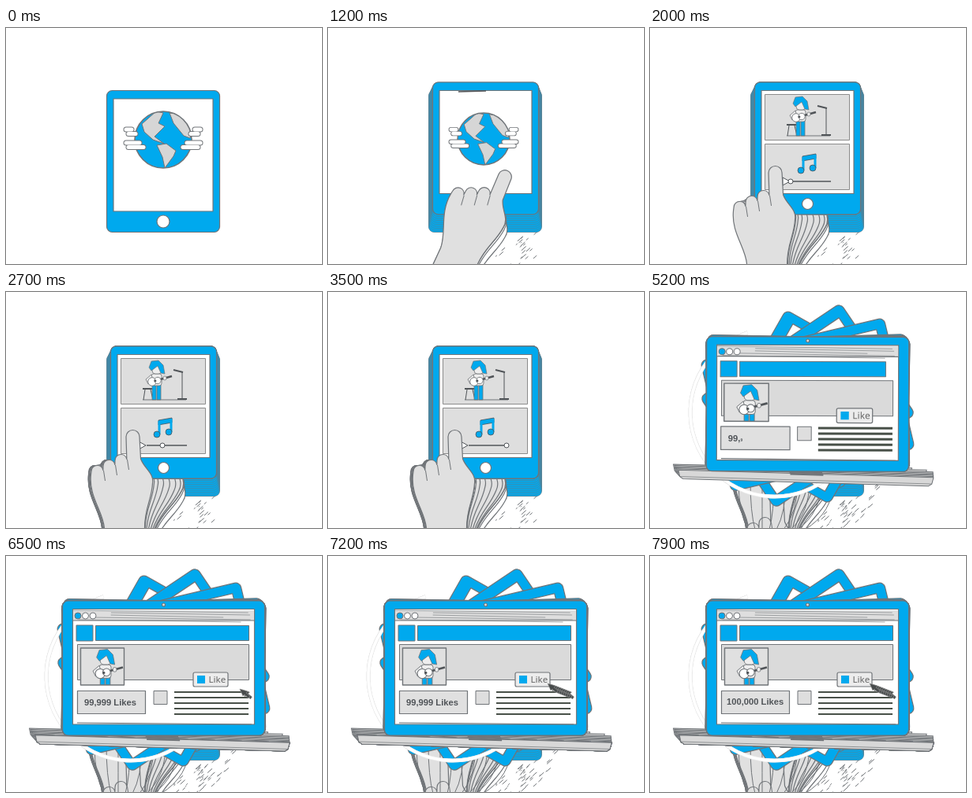
Write an HTML page with a canvas that moves like this. It is 400 by 300 pixels and loops after 8000 ms.

```html
<!DOCTYPE html>
<html lang="en">
<head>
<meta charset="utf-8">
<title>Tablet to laptop</title>
<style>
html, body { margin: 0; width: 100%; height: 100%; overflow: hidden; background: #fff; }
canvas { display: block; width: 400px; height: 300px; }
</style>
</head>
<body>
<canvas id="stage" width="400" height="300"></canvas>
<script>
const ctx = document.getElementById('stage').getContext('2d');
const LOOP = 8000, STEP = 100;
const BLUE = '#00a9ee', GREY = '#dedede', LINE = '#707478', DARK = '#505458';

const clamp = v => Math.max(0, Math.min(1, v));
const ramp = (t, a, b) => clamp((t - a) / (b - a));
const mix = (a, b, p) => a + (b - a) * p;
const smooth = p => p * p * (3 - 2 * p);
const ease = (t, a, b) => smooth(ramp(t, a, b));

function seeded(seed) {
  return () => (seed = (seed * 16807) % 2147483647) / 2147483647;
}

function paint(fill, stroke, width = 1) {
  if (fill) { ctx.fillStyle = fill; ctx.fill(); }
  if (stroke) { ctx.strokeStyle = stroke; ctx.lineWidth = width; ctx.stroke(); }
}
function box(x, y, w, h, fill, stroke, width, r = 0) {
  ctx.beginPath();
  ctx.roundRect(x, y, w, h, r);
  paint(fill, stroke, width);
}
function dot(x, y, r, fill, stroke, width) {
  ctx.beginPath();
  ctx.arc(x, y, r, 0, Math.PI * 2);
  paint(fill, stroke, width);
}
function poly(pts, fill, stroke, width) {
  ctx.beginPath();
  for (let i = 0; i < pts.length; i += 2) ctx.lineTo(pts[i], pts[i + 1]);
  ctx.closePath();
  paint(fill, stroke, width);
}
function line(x1, y1, x2, y2, color, width = 1) {
  ctx.beginPath();
  ctx.moveTo(x1, y1);
  ctx.lineTo(x2, y2);
  paint(null, color, width);
}
function label(text, x, y, font, color) {
  ctx.font = font;
  ctx.fillStyle = color;
  ctx.fillText(text, x, y);
}
function at(x, y, deg, scale, draw) {
  ctx.save();
  ctx.translate(x, y);
  ctx.rotate(deg * Math.PI / 180);
  ctx.scale(scale, scale);
  draw();
  ctx.restore();
}

// The tablet recedes, then spins half a turn while widening into a laptop lid.
function device(t) {
  const back = ramp(t, 0.1, 1), spin = ease(t, 3.55, 4.45), wide = spin * spin;
  const wobble = t > 4.4 ? Math.sin((t - 4.4) * 10) * 1.3 * (1 - ramp(t, 4.5, 5.3)) : 0;
  const p = ramp(t, 3.6, 4.4);
  return {
    x: 199 + 0.5 * back,
    y: mix(mix(169.5, 153, back), 142.5, spin),
    hw: mix(mix(71.5, 67, back), 128, wide),
    hh: mix(mix(90, 84, back), 85.5, wide),
    turn: 180 * spin + wobble,
    side: mix(8.5, 13, p), top: mix(10.5, 14, p), bottom: mix(26.5, 10.5, p),
    button: mix(mix(8 - back, 4.5, p), 2, ramp(t, 4.4, 4.8)),
    gap: mix(mix(13.5, 10, p), 5, ramp(t, 4.4, 4.8))
  };
}

function body(t, ghost) {
  const d = device(t), edge = ghost && t < 3.6 ? 0.5 : 1.2;
  at(d.x, d.y, d.turn, 1, () => {
    box(-d.hw, -d.hh, d.hw * 2, d.hh * 2, BLUE, LINE, edge, 7);
    box(d.side - d.hw, d.top - d.hh, (d.hw - d.side) * 2, d.hh * 2 - d.top - d.bottom, '#fff', LINE, 1.2);
    dot(0, d.hh - d.gap, d.button, t < 3.7 ? '#fff' : GREY, LINE, 1.2);
  });
}

// The keyboard slides out wide, tips over and sinks.
function base(t) {
  if (t < 4.3) return;
  const out = ease(t, 4.2, 4.7), sink = ramp(t, 4.6, 5.3);
  const hw = mix(80, 165, out) - 4 * sink, h = mix(4, 11, out);
  at(mix(203, 193, out) + 5 * sink, 228 + 10 * sink, mix(-3, 1.7, out), 1, () => {
    poly([-hw, -h / 2, hw, -h / 2, hw - 2, h / 4, hw - 6, h / 2, 6 - hw, h / 2, 2 - hw, h / 4], '#d8d8d8', LINE);
    line(2 - hw, h / 4, hw - 2, h / 4, LINE, 0.7);
    box(-20, -h / 2, 42, 2, LINE);
  });
}

function swoosh(t) {
  if (t < 3.85 || t > 4.45) return;
  for (const [color, width] of [['#e8e8e8', 4.6], ['#fff', 3.6]]) {
    ctx.beginPath();
    ctx.arc(158, 153, 107, -1.9, -1.9 - 3.6 * ramp(t, 3.7, 4.3), true);
    paint(null, color, width);
  }
}

function hand(t, ghost) {
  if (t < (ghost ? 0.85 : 0.35) || t > 3.75) return;
  const low = 1 - ease(t, 0.1, 1.1), swipe = ease(t, 1.15, 1.9);
  const x = 228 + 24 * low - 67.5 * swipe - 3 * Math.sin(Math.PI * ramp(t, 1.8, 2.7));
  const y = 182 + 123 * low - 6 * swipe + 200 * ramp(t, 3.6, 3.85);
  at(x, y, 25 * (1 - swipe) + 7 * low, 1, () => {
    ctx.beginPath();
    ctx.arc(0, 8, 8.5, Math.PI, 0);
    ctx.lineTo(10, 36);
    ctx.bezierCurveTo(14, 48, 27, 54, 25, 67);
    ctx.bezierCurveTo(24, 88, 15, 98, 15, 124);
    ctx.lineTo(15, 260);
    ctx.lineTo(-36, 260);
    ctx.lineTo(-36, 124);
    ctx.bezierCurveTo(-38, 102, -56, 84, -53, 56);
    for (let i = 0; i < 3; i++) ctx.arc(i * 15 - 45, 52 - i * 7, 7.5, Math.PI, -0.2);
    ctx.closePath();
    paint(ghost && t < 1.15 ? '#fff' : '#e0e0e0', LINE, 1.2);
    for (let i = 0; i < 3; i++) line(i * 15 - 37, 51 - i * 7, i * 15 - 35, 64 - i * 7, LINE);
  });
}

// Flecks and streaks left behind by the hand.
function flecks(t) {
  const rnd = seeded(77), n = 28 * ramp(t, 0.5, 1) + 32 * ramp(t, 3.7, 4.3);
  for (let i = 0; i < n; i++) {
    const u = rnd() * (i < 28 ? 0.65 : 1), size = 1 + rnd() * 6;
    const x = mix(212, 288, u), y = mix(298, 258, u) + (rnd() - 0.4) * 34;
    line(x, y, x + size, y - size * 0.9, LINE);
  }
}
function streaks() {
  for (let i = 0; i < 9; i++) {
    const x = 112 + i * 15;
    ctx.beginPath();
    ctx.moveTo(x, 240);
    ctx.quadraticCurveTo(x, 280, 124 + i * 9, 302);
    paint(null, LINE);
  }
}

function clouds(side, shift) {
  ctx.lineCap = 'round';
  for (const [color, width] of [[LINE, 7], ['#fff', 5]])
    for (let i = 0; i < 4; i++) {
      const y = -13 + i * 5.5 + (i > 1 ? 6 : 0);
      line(side * (47 - i % 2 * 3 - shift), y, side * (40 - i * 5 - shift), y, color, width);
    }
  ctx.lineCap = 'butt';
}

function globe(x, y, r, shift) {
  at(x, y, 0, r / 36, () => {
    ctx.save();
    dot(0, 0, 36, BLUE);
    ctx.clip();
    poly([-27, -20, -9, -36, 0, -34, -6, -21, 2, -17, -11, -4, 1, 5, -13, 0, -24, -10], '#d6d6d6', LINE);
    poly([-8, 7, 4, 5, 16, 14, 13, 21, 2, 36, -1, 22], '#d6d6d6', LINE);
    poly([8, -34, 24, -32, 36, -10, 34, -2, 26, -5, 13, -21], '#d6d6d6', LINE);
    ctx.restore();
    dot(0, 0, 36, null, LINE, 1.6);
    clouds(-1, shift);
    clouds(1, shift);
  });
}

function player(x, y, s) {
  at(x, y, 0, s, () => {
    for (const leg of [-5, 1]) box(leg, 20, 5, 20, BLUE, LINE, 0.8);
    box(-6, 7, 13, 15, '#eee', LINE, 0.8, 3);
    box(-5, -6, 12, 13, '#eee', LINE, 0.8, 4);
    poly([-9, -1, -6, -9, 3, -10, 9, -4, 11, 7, 6, 6, 2, -3, -6, 3], BLUE, LINE, 0.7);
    poly([-6, 8, -13, 14, -10, 20, -4, 15], '#eee', LINE, 0.8);
    line(2, 15, 20, 10, DARK, 2.4);
    dot(-5, 17, 5.3, '#fff', LINE, 0.9);
    dot(2, 15.5, 4.2, '#fff', LINE, 0.9);
    dot(-1, 16, 1.4, DARK);
    box(9, 10, 4, 5, '#eee', LINE, 0.7, 2);
  });
}

function music(t) {
  for (const y of [84.5, 147.5]) box(145.5, y, 107, 58, GREY, '#8c8c8c');
  line(173, 137, 228, 137, LINE);
  box(173, 122, 13, 2, DARK);
  line(176, 124, 174, 137, DARK);
  line(183, 124, 186, 137, DARK);
  player(190, 97, 1);
  line(223, 101, 223, 136, DARK);
  line(224, 102, 212, 99, DARK, 2);
  line(217, 136, 229, 136, DARK, 2);
  poly([193, 163, 210, 160, 210, 166, 193, 169], BLUE, DARK, 0.8);
  for (const x of [194, 209]) {
    const y = 181 - (x - 194) / 5;
    line(x, y - 17, x, y, BLUE, 3);
    dot(x - 3, y, 4, BLUE, DARK, 0.8);
  }
  poly([168, 190, 177, 195, 168, 200], '#fff', DARK);
  line(178, 195, 229, 195, DARK, 1.6);
  dot(mix(178, 226, ramp(t, 2.2, 3.4)), 195, 3, '#fff', DARK);
}

function tabletScreen(t) {
  if (t >= 3.8) return;
  const d = device(t), swipe = 118 * ease(t, 1.25, 1.95), p = ramp(t, 0.1, 1);
  at(d.x, d.y, d.turn, 1, () => {
    ctx.beginPath();
    ctx.rect(d.side - d.hw + 1, d.top - d.hh + 1, (d.hw - d.side) * 2 - 2, d.hh * 2 - d.top - d.bottom - 2);
    ctx.clip();
    ctx.translate(-d.x - swipe, -d.y);
    globe(mix(199, 197, p), mix(142, 141, p), mix(36, 33, p), 2 * p);
    ctx.translate(118, 0);
    if (swipe) music(t);
  });
  if (t > 0.8 && t < 1.9) line(165, 81, 200, 80, DARK, 1.4);
}

// Scales a part about its centre with a small overshoot.
function pop(t, start, x, y, draw) {
  const p = ramp(t, start, start + 0.3);
  if (!p) return;
  const s = smooth(p) * mix(1.05, 1, ramp(t, start + 0.3, start + 0.6));
  at(x, y, 0, s, () => { ctx.translate(-x, -y); draw(); });
}

function counter(t) {
  const font = size => `bold ${size}px "Liberation Sans", Arial, sans-serif`;
  if (t >= 7.25) return label('100,000 Likes', 97, 189, font(11.2), DARK);
  const text = '99,999 Likes', n = Math.max(0, Math.floor((t - 4.95) / 0.08));
  const shown = text.slice(0, n);
  label(shown, 99, 190, font(11.2), DARK);
  if (n) label(text.slice(n, n + 1), 99 + ctx.measureText(shown).width, 190, font(5), DARK);
}

function chrome(t) {
  const low = mix(112, 82, ease(t, 4.4, 4.8)), filled = t > 4.45, rnd = seeded(9);
  if (filled) box(85, 69, 229, low - 69, GREY);
  line(85, low, 314, low, filled ? LINE : '#d9cfd3', 1.2);
  for (let i = 0; i < 5 && t > 4.6; i++)
    line(85 + rnd() * 60, 69 + i * 3, 314 - rnd() * 40, 72 + i * 3, LINE, 0.6);
  for (let i = 0; i < 3; i++) {
    const r = 4 * ramp(t, 4.1 + i * 0.17, 4.5 + i * 0.17);
    if (r) dot(91 + i * 9.5, 76, r, i ? '#fff' : BLUE, LINE);
  }
}

function profilePage(t) {
  chrome(t);
  pop(t, 4.55, 99.5, 98, () => box(89, 88, 21, 20, BLUE, LINE));
  const w = 194 * ramp(t, 4.6, 5.23);
  if (w) box(113.5, 88.5, w, 19, BLUE, LINE);

  pop(t, 4.6, 199, 135, () => box(90.5, 112.5, 217, 45, '#dadada', LINE));
  pop(t, 4.75, 122, 140.5, () => {
    ctx.save();
    box(94.5, 117, 55, 47, '#e0e0e0');
    ctx.clip();
    player(125, 130, 1.15);
    ctx.restore();
    box(94.5, 117, 55, 47, null, LINE, 1.4);
  });
  pop(t, 4.8, 259, 157, () => {
    box(237, 148, 44, 18, '#ececec', LINE, 1.2, 2);
    box(242, 152, 10, 10, BLUE);
    label('Like', 256.5, 161, '11.5px "Noto Sans", "Open Sans", sans-serif', '#666');
  });
  pop(t, 4.7, 133, 186, () => box(90.5, 171.5, 86, 29, '#e0e0e0', LINE, 1.2));
  counter(t);
  pop(t, 4.8, 195, 180, () => box(187, 171.5, 17, 17, GREY, LINE));

  const thick = mix(3, 2, ramp(t, 5.2, 5.5));
  for (let i = 0; i < 5; i++)
    line(213, 173 + i * 7, 213 + 94 * ramp(t, 4.7 + i * 0.05, 5 + i * 0.05), 173 + i * 7, '#485048', thick);
  if (t > 4.9) line(90, 212, 311, 214, LINE, 1.2);
}

function cursor(x, y) {
  at(x, y, 0, 1, () =>
    poly([0, 0, 10, 3, 8, 5, 13, 9, 11, 12, 6, 7, 4, 9], '#484c4c', '#999', 0.6));
}

function laptopScreen(t) {
  if (t < 4.25) return;
  const d = device(t);
  at(d.x, d.y, d.turn - 180, d.hw / 128, () => {
    ctx.translate(-199.5, -142.5);
    profilePage(t);
  });
  for (let k = 64; k <= Math.min(72, Math.round(t * 10)); k++) {
    const p = ramp(k, 63, 72);
    cursor(mix(301, 278, p), mix(171, 162, p));
  }
}

// Earlier outlines stay on the stage and form the trails.
function draw(step) {
  ctx.fillStyle = '#fff';
  ctx.fillRect(0, 0, 400, 300);
  ctx.lineJoin = 'round';
  flecks(step / 10);
  for (let k = 0; k <= step; k++) {
    const t = k / 10, now = k === step;
    if (k === 39) streaks();
    base(t);
    body(t, !now);
    if (now) { tabletScreen(t); laptopScreen(t); }
    swoosh(t);
    hand(t, !now);
  }
}

let last = -1;
const start = performance.now();
function tick() {
  const step = Math.floor(((performance.now() - start) % LOOP) / STEP);
  if (step !== last) draw(last = step);
  requestAnimationFrame(tick);
}
tick();
</script>
</body>
</html>
```
